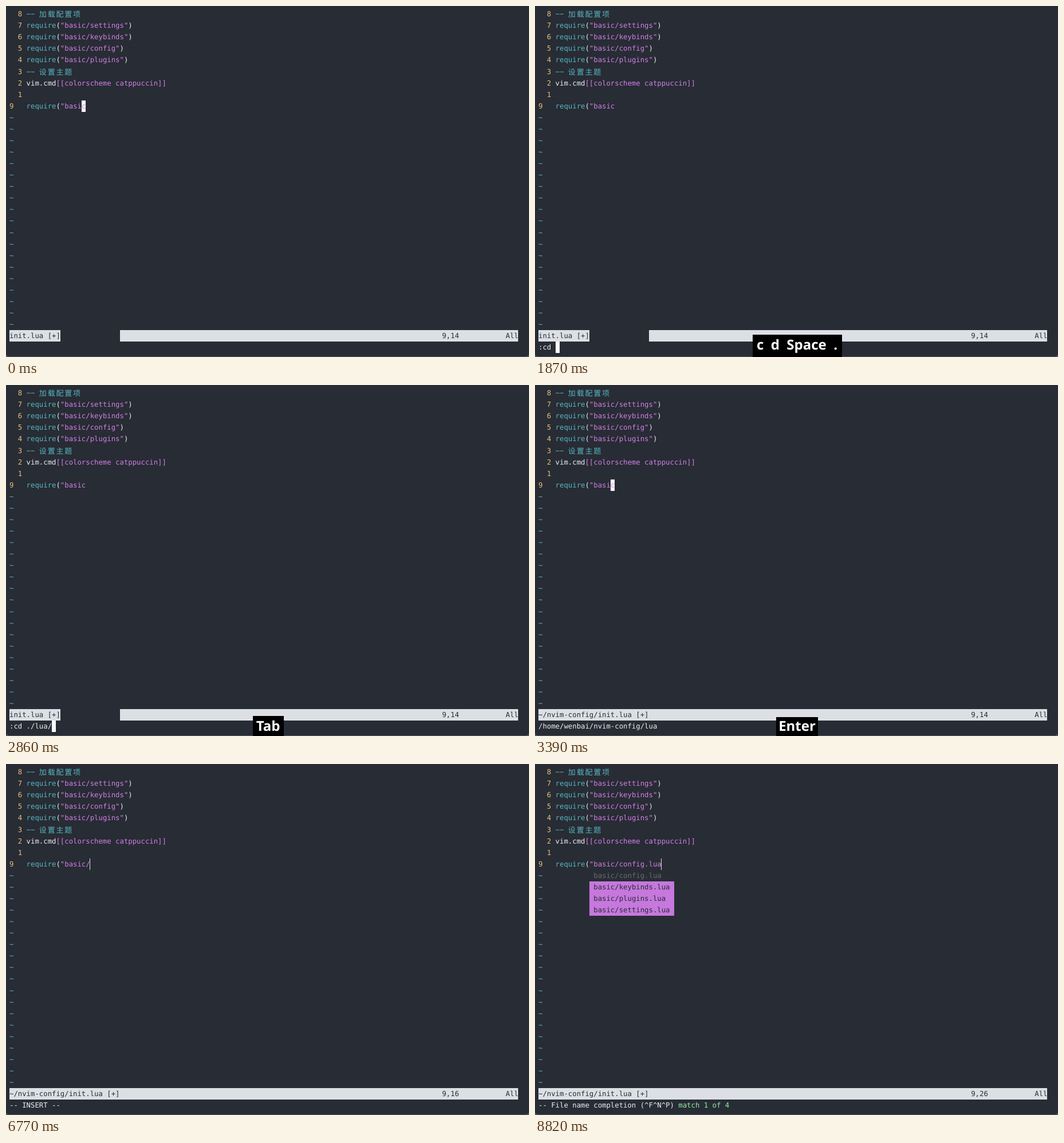
Write an HTML page that moves like this. It is 913x613 px and loops after 9.15 s.

```html
<!DOCTYPE html>
<html lang="zh">
<head>
<meta charset="utf-8">
<title>Editor</title>
<style>
html, body { margin: 0; width: 100%; height: 100%; overflow: hidden; background: #50545c; }
#win { position: absolute; left: 0; top: 0; width: 913px; height: 612px; background: #282c34; border-radius: 0 0 5px 5px; }
#win, #keys { text-rendering: geometricPrecision; white-space: pre; }
#win { font: 12.3px/20px "DejaVu Sans Mono", monospace; color: #eceff4; }
#win div, #keys, #keys span { position: absolute; }
.y { color: #e5c07b; }
.c { color: #56b6c2; }
.s { color: #d07fe8; }
.t { color: #5bb5d8; }
.g { color: #8ff0a8; }
.dim { color: #686b70; }
.bar { background: #dcdfe4; color: #282c34; }
.menu { background: #c678dd; color: #282c34; }
.block { background: #fff; color: #d07fe8; }
.cjk { font: 13px/20px "Noto Sans CJK SC", "Noto Sans CJK", sans-serif; letter-spacing: 1.8px; }
#keys { background: #000; color: #fff; font: bold 24px/34px "Open Sans", "Noto Sans", sans-serif; overflow: hidden; }
#keys span { left: 50%; transform: translateX(-50%); }
</style>
</head>
<body>
<div id="win"><div id="fixed"></div><div id="live"></div></div>
<div id="keys"></div>
<script>
const LOOP = 9150, W = 7.404, H = 20.07;
const $ = id => document.getElementById(id);
const px = n => n.toFixed(2) + "px";
const span = (cls, text) => `<span class="${cls}">${text}</span>`;
const rowTop = row => 4.2 + row * H;

// One piece of text on the character grid; cols > 0 gives it a filled width.
function cell(col, row, html, cls = "", cols = 0) {
  const size = cols ? `width:${px(cols * W)};height:${px(H)};` : "";
  return `<div class="${cls}" style="left:${px(6 + col * W)};top:${px(rowTop(row))};${size}">${html}</div>`;
}

const req = name => span("c", "require") + "(" + span("s", `"${name}`);
const note = text => cell(4, 0, "−−", "c") + cell(7, 0, text, "c cjk");

function drawFixed() {
  const load = name => req(`basic/${name}"`) + ")";
  const code = ["settings", "keybinds", "config", "plugins"].map(load);
  let out = note("加载配置项");
  code.forEach((line, i) => out += cell(4, i + 1, line));
  out += cell(4, 5, "−−", "c") + cell(7, 5, "设置主题", "c cjk");
  out += cell(4, 6, "vim.cmd" + span("s", "[[colorscheme catppuccin]]"));
  for (let i = 0; i < 8; i++) out += cell(2, i, 8 - i, "y");
  out += cell(0, 8, "9", "y");
  for (let row = 9; row < 28; row++) out += cell(0, row, "~", "t");
  $("fixed").innerHTML = out;
}

// Editor states: [start, mode, bottom line, text after the quote, column]
const edits = [
  [0, "normal", "", "basic", 14],
  [810, "cmd", ":", "basic", 14],
  [1360, "cmd", ":c", "basic", 14],
  [1420, "cmd", ":cd", "basic", 14],
  [1480, "cmd", ":cd ", "basic", 14],
  [1940, "cmd", ":cd .", "basic", 14],
  [2010, "cmd", ":cd ./", "basic", 14],
  [2330, "cmd", ":cd ./l", "basic", 14],
  [2530, "cmd", ":cd ./lua/", "basic", 14],
  [3190, "normal", "/home/wenbai/nvim-config/lua", "basic", 14],
  [4290, "insert", "-- INSERT --", "basic", 15],
  [5930, "insert", "-- INSERT --", "basic/", 16],
  [7430, "insert", "-- ^X mode (^]^D^E^F^I^K^L^N^O^Ps^U^V^Y)", "basic/", 16],
  [7890, "menu", "-- File name completion (^F^N^P) " + span("g", "match 1 of 4"), "basic/config.lua", 26]
];

// Pressed keys: [start, text, box width, box top]
const presses = [
  [0, ""],
  [560, "Shift", 69, 577],
  [750, "Shift + ;", 103, 575.5],
  [1280, "Shift + ;  c", 129, 575.5],
  [1360, "Shift + ;  c  d", 156, 575.5],
  [1420, "Shift + ;  c  d  Space", 241, 573],
  [1670, "c  d  Space", 137, 574],
  [1870, "c  d  Space  .", 156, 574],
  [1940, "c  d  Space  .  /", 183, 574],
  [2210, "d  Space  .  /", 158, 574],
  [2270, ".  /  l", 64, 576],
  [2460, ".  /  l  Tab", 117, 576],
  [2530, "/  l  Tab", 98, 576],
  [2800, "l  Tab", 71, 578],
  [2860, "Tab", 54, 578],
  [3190, "Tab  Enter", 127, 578],
  [3390, "Enter", 73, 579.5],
  [4120, ""],
  [4290, "a", 28, 581],
  [5260, ""],
  [5850, "/", 27, 577],
  [6770, ""],
  [6900, "Ctrl", 54, 578],
  [7430, "Ctrl + x", 101, 578],
  [7890, "Ctrl + x  Ctrl + f", 197, 578],
  [8300, "Ctrl + f", 98, 578],
  [8820, ""]
];

function drawEdit([start, mode, line, typed, column]) {
  let out = cell(4, 8, req(typed));
  const end = 13 + typed.length;
  if (mode === "normal") out += cell(end - 1, 8, "c", "block", 1);
  else if (mode === "cmd") out += cell(line.length, 29, "", "block", 1);
  else out += `<div style="left:${Math.floor(6 + end * W)}px;top:${px(rowTop(8))};width:1px;height:20px;background:#dcdfe4"></div>`;

  if (mode === "menu") {
    out += cell(13, 9, "basic/config.lua", "dim");
    ["keybinds", "plugins", "settings"].forEach((name, i) =>
      out += cell(12, 10 + i, ` basic/${name}.lua`, "menu", 20));
  }

  if (start < 3190) out += cell(0, 28, "init.lua [+]", "bar", 12) + cell(26, 28, "", "bar", 94);
  else out += cell(0, 28, "~/nvim-config/init.lua [+]", "bar", 120);
  out += cell(102, 28, "9," + column, "bar") + cell(117, 28, "All", "bar");
  $("live").innerHTML = out + cell(0, 29, line);
}

function drawKeys([, text, width, top]) {
  const box = $("keys");
  box.style.display = text ? "block" : "none";
  if (!text) return;
  const base = 604.5 - (/p/.test(text) ? 4 : /[;\/]/.test(text) ? 2 : 0);
  box.style.left = px(457.5 - width / 2);
  box.style.top = px(top);
  box.style.width = px(width);
  box.style.height = px(613 - top);
  box.innerHTML = `<span style="top:${px(base - 26 - top)}">${text}</span>`;
}

const at = (list, t) => list.findLast(item => item[0] <= t);
let edit, press;
const begin = performance.now();

function tick() {
  const t = (performance.now() - begin) % LOOP;
  const nextEdit = at(edits, t), nextPress = at(presses, t);
  if (nextEdit !== edit) drawEdit(edit = nextEdit);
  if (nextPress !== press) drawKeys(press = nextPress);
  requestAnimationFrame(tick);
}

drawFixed();
tick();
</script>
</body>
</html>
```
